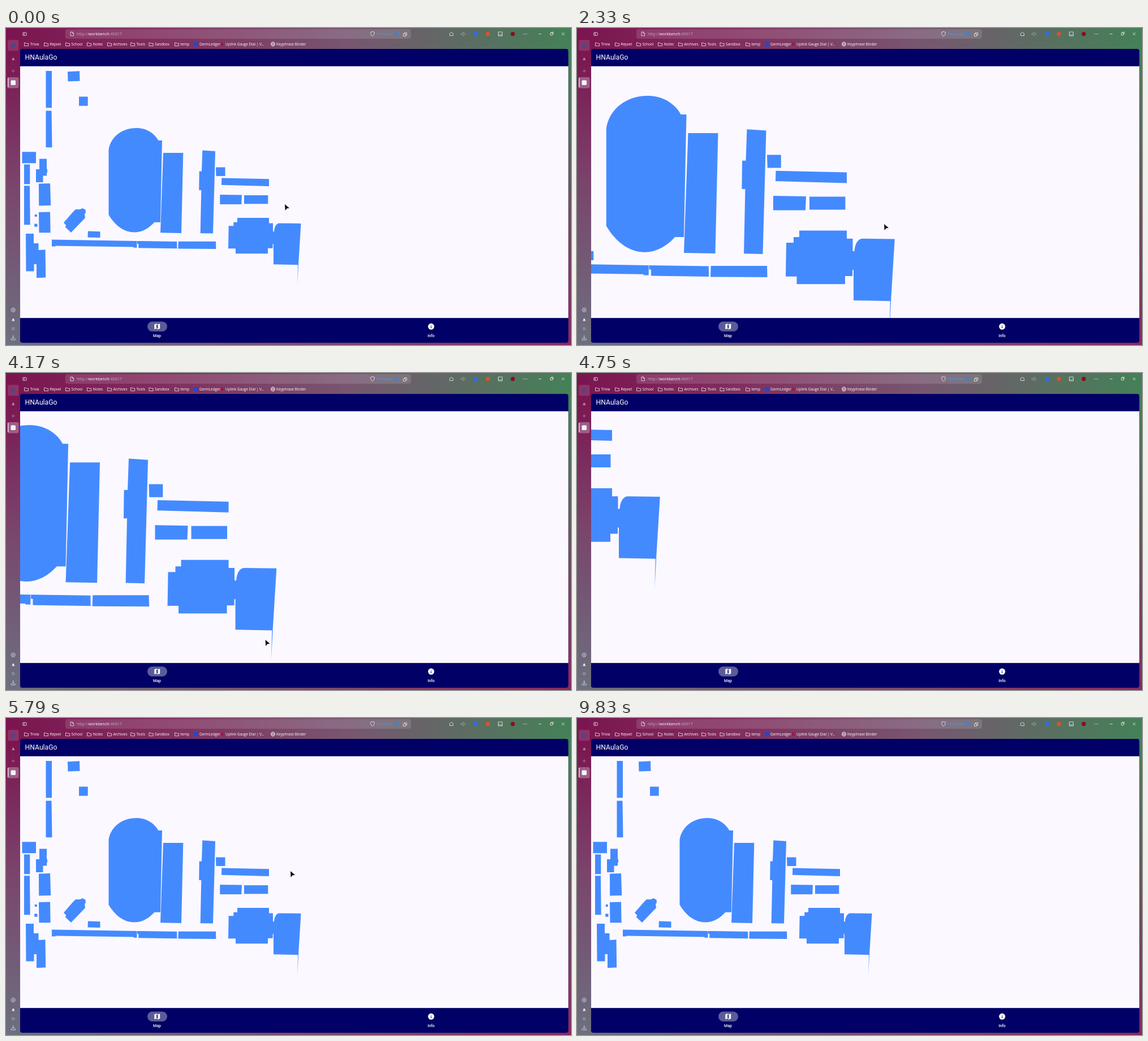
Write an HTML page that moves like this. It is 999x561 px and loops after 9870 ms.

```html
<!DOCTYPE html>
<html lang="en">
<head>
<meta charset="utf-8">
<title>Campus map</title>
<style>
html, body { margin: 0; width: 100%; height: 100%; overflow: hidden; }
svg { display: block; width: 100vw; height: 100vh; }
text { fill: #fff; font-family: "Open Sans", sans-serif; font-size: 6.4px; }
.url { font-size: 7.1px; }
.dim { fill: #c3a9bd; }
.app text { font-family: Roboto, sans-serif; font-size: 7px; font-weight: 500; text-anchor: middle; }
.app .title { font-size: 12.2px; font-weight: 400; text-anchor: start; }
.line { fill: none; stroke: #eee; stroke-width: .8; }
.faint { opacity: .45; }
</style>
</head>
<body>
<svg viewBox="0 0 999 561">
  <defs>
    <linearGradient id="top">
      <stop offset="0" stop-color="#7b1450"/><stop offset=".3" stop-color="#80305f"/>
      <stop offset=".6" stop-color="#785570"/><stop offset="1" stop-color="#448157"/>
    </linearGradient>
    <linearGradient id="left" x2="0" y2="1">
      <stop offset="0" stop-color="#7b1450"/><stop offset=".45" stop-color="#7a446c"/>
      <stop offset="1" stop-color="#6c7080"/>
    </linearGradient>
    <linearGradient id="right" x2="0" y2="1">
      <stop offset="0" stop-color="#448157"/><stop offset="1" stop-color="#8a2860"/>
    </linearGradient>
    <linearGradient id="bottom">
      <stop offset="0" stop-color="#6c7080"/><stop offset="1" stop-color="#8a2860"/>
    </linearGradient>
    <clipPath id="page"><path d="M25 67.7H994.3V513.2H25Z"/></clipPath>
    <path id="folder" class="line" d="M.5 1h2.7l1 1.200h3.400v4.300h-7.100Z"/>
    <path id="bell" d="M0 3q1.300-1 1.300-3a1.500 1.500 0 0 1 3 0q0 2 1.300 3Z"/>
  </defs>

  <rect width="999" height="561" fill="url(#top)"/>
  <rect y="37" width="25" height="524" fill="url(#left)"/>
  <rect x="994" y="37" width="5" height="524" fill="url(#right)"/>
  <rect y="556" width="999" height="5" fill="url(#bottom)"/>

  <!-- browser toolbar -->
  <rect x="105" y="2" width="611" height="17" rx="4" fill="#fff" opacity=".13"/>
  <g class="line">
    <rect x="29.8" y="8" width="6.4" height="5.2" rx="1"/><path d="M32 8v5"/>
    <path d="M114 7h3.4l2.2 2.2v4.6H114ZM117.2 7v2.4h2.4"/>
    <path d="M648 6.3l3.5 1.3q.2 5-3.5 7.2-3.7-2.200-3.500-7.200Z"/>
    <path d="M702.5 10.3h4.200v4.200h-4.200ZM704.3 10V8.400h4.300v4.200h-1.800"/>
    <path d="M784.5 9.5l3-2 3 2v4h-6Z"/>
    <path class="faint" d="M804.5 9.3h2l2.5-2v6.5l-2.500-2h-2ZM811 8.5q2 2 0 4"/>
    <path d="M870.5 7h7v7h-7Zm0 4.500h2l1 1h1.500l1-1h1.500"/>
    <path d="M941.8 10.500h5M962.5 8.700h3.800v3.800h-3.800ZM964 8.500V7.300h3.600V11M982.8 8.200l4.600 4.600m0-4.600l-4.600 4.600"/>
  </g>
  <path d="M915.300 10.700h6" stroke="#eee" stroke-width="1.300" stroke-linecap="round" stroke-dasharray="0 2.700"/>
  <rect x="827.5" y="7" width="7" height="7" fill="#2f6fe0"/>
  <circle cx="852" cy="10.500" r="3.700" fill="#d9532c"/>
  <circle cx="896" cy="10.500" r="3.700" fill="#86101c"/>
  <text class="url" x="125" y="13.300"><tspan class="dim">http://</tspan>workbench<tspan class="dim">:40617</tspan></text>
  <text class="url" x="655" y="13.300" style="fill:#3b9df5">Personal</text>
  <rect x="688.5" y="7.500" width="5" height="6" rx="1" fill="#2f86e6"/>

  <!-- bookmarks -->
  <g id="marks"></g>
  <rect x="332" y="25" width="7.500" height="7.500" fill="#2448c8"/>
  <circle cx="382" cy="28.500" r="2.800" fill="#a5153f"/>
  <g class="line"><circle cx="472" cy="28.500" r="3.600"/><ellipse cx="472" cy="28.500" rx="1.600" ry="3.600"/><path d="M468.400 28.500h7.200"/></g>
  <text x="342" y="31">GermLedger</text>
  <text x="388" y="31">Uplink Gauge Dial | V...</text>
  <text x="478" y="31">Keyphrase Binder</text>

  <!-- side bar -->
  <rect x="3" y="21" width="19.500" height="19.500" rx="3" fill="#fff" opacity=".13"/>
  <circle cx="12.700" cy="31" r="4" fill="#524488"/>
  <use href="#bell" x="10" y="54" fill="#a88aa0"/>
  <path class="line faint" d="M12.700 73v6M9.700 76h6"/>
  <rect x="3" y="87" width="19.500" height="19.500" rx="3" fill="#fff" opacity=".28"/>
  <rect x="3" y="88" width="1.200" height="17" rx=".6" fill="#fff"/>
  <rect x="8.500" y="92.500" width="8.500" height="8.500" rx="1.500" fill="#f2f4fa"/>
  <g class="line">
    <path d="M9 499l1.800-3.200h3.800l1.800 3.200-1.800 3.200h-3.800Z"/><circle cx="12.700" cy="499" r="1"/>
    <path class="faint" d="M10 530.500h5.500M10 532.200h5.500M10 534h5.500"/>
    <path d="M12.700 544v5.500m-2-2l2 2 2-2M9.200 549.500v2.500h7v-2.500"/>
  </g>
  <use href="#bell" x="10" y="515.500" fill="#efe6cf"/>

  <!-- page -->
  <rect x="25" y="37" width="969.300" height="520" rx="4" fill="#000066"/>
  <rect x="25" y="67.700" width="969.300" height="445.500" fill="#fbf8ff"/>
  <g clip-path="url(#page)">
    <g id="map" fill="#448aff">
      <!-- stadium -->
      <path d="M181.500 215.500C185 192 206 177 230 177C246 177 261 184 269.500 199H276L273 343.700H262.500C253 354 241 361.500 227 361.500C209 361.500 193 350 181.500 330.500Z"/>
      <!-- long halls beside it -->
      <path d="M278 221h35.300L310 363l-37-.7Z"/>
      <path d="M347.300 216.500l22.700 1.500-4 145.600-22.300-.4 1.600-76.200h-4l.4-33.500h4.300Z"/>
      <path d="M371 246.600h16.500V262h-16ZM421 296h42.300v15.300H421Z"/>
      <path d="M381.300 265.500l83.700 1.800V280l-84-2.300ZM378.300 295l38.700.6-.7 16.400h-38Z"/>
      <!-- main block and annex -->
      <path d="M409 336h56v9.500h7v14.800h2C474.500 352 478 345.500 483.500 345.500l38 .5-4.500 73.200-44-.9v-36h-1.300v7.400H463v9.500h-57v-9h-13l.7-39.900h8.600v-6.600h6.700Z"/>
      <path d="M516.200 419h.9l-1.900 35Z"/>
      <!-- southern row -->
      <path d="M81 374.500l150.500 2.500v11.700h-6v-1.200L88 385.500l-1 1h-6Z"/>
      <path d="M232 377l70.200 1 .2 12.300-68.100-1V382H232ZM304.800 377.700H371l.4 13.300-67-.4Z"/>
      <path d="M145 359.500l21.500.8V371l-22-.5Z"/>
      <path d="M102 344.500L118 326l5-5h8l4-2 5.500 2.500.5 5.500-2 2 1 7-25 26-10.500-10 2-2.500Z"/>
      <!-- western side -->
      <path d="M70.500 76H81v65.300H70.500Zm0 70.500h10l1 64.800h-11ZM109 77.300l21-1 .5 17.400-21 .9ZM129 121.500h15.700v16.200H129Z"/>
      <path d="M28.500 219.300H53v20H28.500ZM32 241.500h10.300v34.800H32Zm0 37.800h10l.7 69H32Z"/>
      <path d="M59 231.500h13v18h1v6.500h-1v5.500h-6.500V273H53v-23h6Z"/>
      <path d="M58 275.500l20-.5 1.200 39-21 .6ZM58 326l20-.5.6 36.800H58.500ZM50.200 346.500h5.300v5.300h-5.300Z"/>
      <circle cx="52.800" cy="332" r="2.300"/>
      <path d="M35 364h14v17h8.500v12l12-.7.700 49.200-16.200.8V418h-4.500v12.500h-14Z"/>
    </g>
  </g>
  <g class="app">
    <text class="title" x="33.500" y="56.200">HNAulaGo</text>
    <rect x="250" y="519.500" width="35" height="17.500" rx="8.700" fill="#5b5b98"/>
    <path transform="translate(260.700 521.700) scale(.5475)" fill="#fff" fill-rule="evenodd" d="M3 5l6-2 6 2 6-2v16l-6 2-6-2-6 2ZM9 5v12l6 2V7Z"/>
    <text x="267" y="547.300">Map</text>
    <circle cx="751.700" cy="528.300" r="5.500" fill="#fff"/>
    <path d="M751.700 525.500v1.100m0 1.100v3.300" stroke="#000066" stroke-width="1.100"/>
    <text x="751.700" y="547.300">Info</text>
  </g>
  <path id="cursor" d="M0 0L8 6.800 3.700 7.300 .7 11Z" fill="#0b0b12"/>
</svg>
<script>
const LOOP = 9870, STEP = 1000 / 24, ZOOM = 1.5;
const page = { x: 25, y: 68 };
// how far the zoomed map may be dragged
const reach = { x: [-635.5, -220.5], y: [-300, -145.5] };
const $ = id => document.getElementById(id);
const clamp = (v, [lo, hi]) => Math.min(hi, Math.max(lo, v));

const folders = { Trivia: 32, Repvel: 67, School: 105, Notes: 143, Archives: 179, Tools: 220, Sandbox: 252.5, temp: 298 };
$("marks").innerHTML = Object.entries(folders).map(([name, x]) =>
  `<use href="#folder" x="${x}" y="25.2"/><text x="${x + 10.5}" y="31">${name}</text>`).join("");

// The pointer glides between points; a drag takes the map along, a tap toggles the zoom.
const glide = (from, to, x, y, held = false) => ({ from, to, x, y, held });
const drag = (from, to, x, y) => glide(from, to, x, y, true);
const tap = from => ({ from, tap: true });

const start = { x: 493, y: 312 };
const gestures = [
  glide(40, 210, 473, 308),
  tap(460),
  drag(1080, 1460, 5, 171),
  drag(1460, 1630, 197, 206),
  drag(1630, 1960, 562, 340),
  glide(1960, 2330, 543, 347),
  glide(2330, 2720, 538, 415),
  tap(2750),
  glide(2750, 2960, 533, 447),
  tap(3080),
  drag(3420, 3620, 127, 133),
  drag(3620, 3830, 542, 223),
  drag(3830, 4080, 542, 500),
  drag(4080, 4600, 60, 340),
  glide(4600, 4750, -7, 384),
  glide(4800, 5330, 565, 300),
  tap(5420),
  glide(5420, 5790, 503, 271),
  glide(5790, 6080, 692, 183),
  glide(6330, 6670, 735, 102),
  glide(7500, 7920, 32, 258)
];
const leaves = gestures[gestures.length - 1].to;

function stateAt(t) {
  const hand = { ...start };
  let map = { x: 0, y: 0, scale: 1 };
  for (const g of gestures) {
    if (g.from > t) break;
    if (g.tap) {
      const shift = axis => page[axis] * (2 - ZOOM) - hand[axis];
      map = map.scale > 1 ? { x: 0, y: 0, scale: 1 } : { x: shift("x"), y: shift("y"), scale: ZOOM };
      continue;
    }
    const k = Math.min(1, (t - g.from) / (g.to - g.from));
    for (const axis of ["x", "y"]) {
      const delta = (g[axis] - hand[axis]) * k;
      hand[axis] += delta;
      if (g.held) map[axis] = clamp(map[axis] + delta, reach[axis]);
    }
  }
  return { hand, map };
}

function draw() {
  const now = performance.now() % LOOP;
  // the screen advances in 24ths of a second, on a 10 ms grid
  const t = Math.round(Math.floor((now + 5) / STEP) * STEP / 10) * 10;
  const { hand, map } = stateAt(t);
  $("map").setAttribute("transform", `translate(${map.x} ${map.y}) scale(${map.scale})`);
  $("cursor").setAttribute("transform", `translate(${hand.x} ${hand.y})`);
  $("cursor").setAttribute("visibility", t < leaves ? "visible" : "hidden");
  requestAnimationFrame(draw);
}
draw();
</script>
</body>
</html>
```
